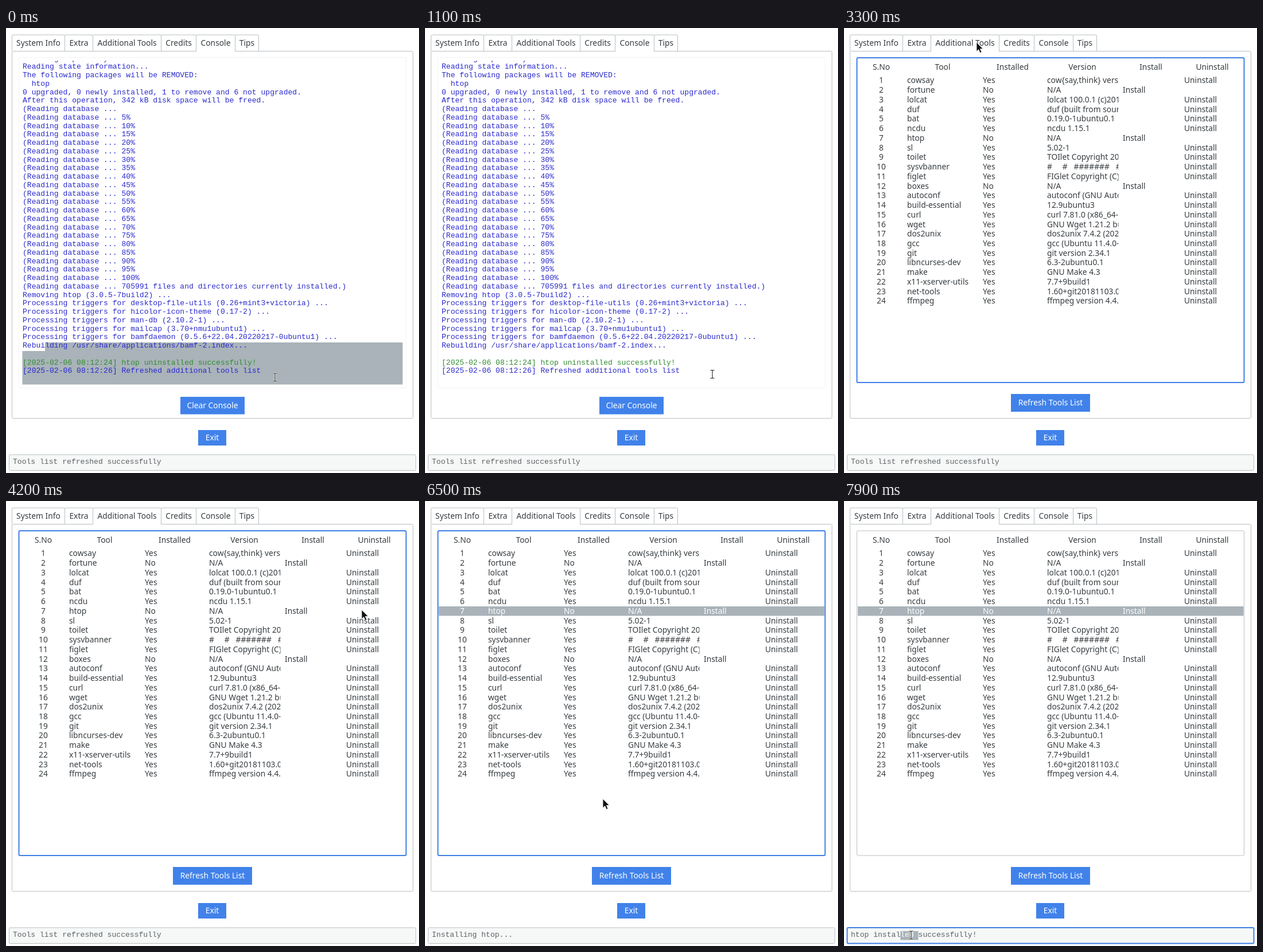
Write an HTML page that moves like this. It is 720x777 px and loops after 8000 ms.

```html
<!DOCTYPE html>
<html lang="en">
<head>
<meta charset="utf-8">
<title>Tool manager</title>
<style>
  html, body { margin: 0; height: 100%; overflow: hidden; background: #fff; }
  svg { display: block; width: 100vw; height: 100vh; }
  text { font: 13.8px "Noto Sans", sans-serif; fill: #363c40; white-space: pre; }
  .mono { font: 13.07px "Liberation Mono", monospace; fill: #2a2acc; }
  .ok { fill: #328c32; }
  .status { fill: #5c6062; }
  .light { fill: #fff; }
  .mid { text-anchor: middle; }
  .line { fill: none; stroke: #b9bfc2; }
  .sel { fill: #a9b3b9; }
  .button { fill: #4182ea; }
</style>
</head>
<body>
<svg id="stage" viewBox="0 0 720 777"></svg>
<script>
const LOOP = 8000, LINE = 14.75, ROW = 16.74, CHAR = 7.842;
const BLUE = '#3f7fe6', GREY = '#b9bfc2';

const text = (x, y, s, cls = '') => `<text x="${x}" y="${y}" class="${cls}">${s}</text>`;
const rect = (x, y, w, h, attrs) => `<rect x="${x}" y="${y}" width="${w}" height="${h}" ${attrs}/>`;
const button = (x, y, w, h, label) =>
  rect(x, y, w, h, 'class="button"') + text(x + w / 2, y + h / 2 + 4.8, label, 'mid light');

// Console page
const percents = Array.from({ length: 20 }, (_, i) => `(Reading database ... ${i * 5 + 5}%`);
const consoleLines = [
  'Building dependency tree...',
  'Reading state information...',
  'The following packages will be REMOVED:',
  '  htop',
  '0 upgraded, 0 newly installed, 1 to remove and 6 not upgraded.',
  'After this operation, 342 kB disk space will be freed.',
  '(Reading database ...',
  ...percents,
  '(Reading database ... 705991 files and directories currently installed.)',
  'Removing htop (3.0.5-7build2) ...',
  ...['desktop-file-utils (0.26+mint3+victoria)', 'hicolor-icon-theme (0.17-2)', 'man-db (2.10.2-1)',
    'mailcap (3.70+nmu1ubuntu1)', 'bamfdaemon (0.5.6+22.04.20220217-0ubuntu1)']
    .map(s => `Processing triggers for ${s} ...`),
  'Rebuilding /usr/share/applications/bamf-2.index...',
  '',
  '[2025-02-06 08:12:24] htop uninstalled successfully!',
  '[2025-02-06 08:12:26] Refreshed additional tools list'
];
const consolePage = `
  ${rect(22.5, 51.5, 675, 577, 'class="line" style="stroke:#f2f3f3"')}
  <path id="consoleSel" class="sel" d="M68 549H691.5V622.5H28.5V564H68Z"/>
  <g clip-path="url(#consoleClip)">${consoleLines.map((s, i) =>
    text(29, 56.6 + i * LINE, s, s.includes('uninstalled') ? 'mono ok' : 'mono')).join('')}</g>
  ${button(304, 644, 112, 30.5, 'Clear Console')}`;

// Tools page: name and version; a missing version means not installed
const tools = [
  ['cowsay', 'cow{say,think} version'], ['fortune'], ['lolcat', 'lolcat 100.0.1 (c)2011'],
  ['duf', 'duf (built from source)'], ['bat', '0.19.0-1ubuntu0.1'], ['ncdu', 'ncdu 1.15.1'], ['htop'],
  ['sl', '5.02-1'], ['toilet', 'TOIlet Copyright 2006'], ['sysvbanner', '#     #   #######   #'],
  ['figlet', 'FIGlet Copyright (C) 1991'], ['boxes'], ['autoconf', 'autoconf (GNU Autoconf)'],
  ['build-essential', '12.9ubuntu3'], ['curl', 'curl 7.81.0 (x86_64-pc'], ['wget', 'GNU Wget 1.21.2 built'],
  ['dos2unix', 'dos2unix 7.4.2 (2022'], ['gcc', 'gcc (Ubuntu 11.4.0-1ubuntu1'], ['git', 'git version 2.34.1'],
  ['libncurses-dev', '6.3-2ubuntu0.1'], ['make', 'GNU Make 4.3'], ['x11-xserver-utils', '7.7+9build1'],
  ['net-tools', '1.60+git20181103.0eebece'], ['ffmpeg', 'ffmpeg version 4.4.2']
];
const toolRow = ([name, version], i) => {
  const y = 96.4 + i * ROW;
  return `<g id="${name}">` + text(65, y, i + 1, 'mid') + text(110, y, name) +
    text(242, y, version ? 'Yes' : 'No') +
    `<g clip-path="url(#versionClip)">${text(354, y, version || 'N/A')}</g>` +
    (version ? text(593, y, 'Uninstall') : text(486, y, 'Install')) + '</g>';
};
const headers = [['S.No', 65], ['Tool', 172], ['Installed', 294], ['Version', 415.5], ['Install', 535], ['Uninstall', 642]];
const toolsPage = `
  ${rect(22.5, 52, 675, 567, 'id="tableFrame" class="line" rx="2"')}
  ${rect(24, 184, 672.5, 16.5, 'id="rowSel" class="sel"')}
  ${headers.map(([s, x]) => text(x, 72.8, s, 'mid')).join('')}
  ${tools.map(toolRow).join('')}
  ${button(291, 639, 138, 31, 'Refresh Tools List')}`;

const tabs = ['System Info', 'Extra', 'Additional Tools', 'Credits', 'Console', 'Tips'];
const edges = [10.5, 102.5, 151.5, 270.5, 331.5, 399.5, 440.5];
const tabBar = tabs.map((s, i) =>
  `<path class="line" d="M${edges[i]} 40V14q0 -2 2 -2H${edges[i + 1] - 2}q2 0 2 2V40"/>` +
  text((edges[i] + edges[i + 1]) / 2, 30.8, s, 'mid')).join('');

document.getElementById('stage').innerHTML = `
  <clipPath id="consoleClip">${rect(23, 57, 674, 570, '')}</clipPath>
  <clipPath id="versionClip">${rect(350, 52, 128.5, 567, '')}</clipPath>
  ${rect(10.5, 40.5, 699, 641, 'class="line" rx="2"')}
  ${tabBar}
  <path id="tabGap" stroke="#fff" stroke-width="2"/>
  <g id="consolePage">${consolePage}</g>
  <g id="toolsPage">${toolsPage}</g>
  ${button(335, 702, 49, 27, 'Exit')}
  ${rect(5.5, 745, 709, 27.5, 'id="statusFrame" rx="2" fill="#f6f8f8"')}
  ${rect(12 + 11 * CHAR, 751, 4 * CHAR, 15.5, 'id="statusSel" class="sel"')}
  <text id="status" x="12" y="760.7" class="mono status"></text>
  <path id="arrow" d="M0 0V16L3.7 12.5L6.3 18.5L9 17.3L6.4 11.5H11.3Z" fill="#111" stroke="#fff" stroke-width=".8"/>
  <g id="beam" fill="none"><path id="beamShape" stroke="#fff" stroke-width="2.6"
    d="M-3.5 -7H-1L0 -6L1 -7H3.5M0 -6V6M-3.5 7H-1L0 6L1 7H3.5"/><use href="#beamShape"/></g>`;

const el = id => document.getElementById(id);
el('beam').lastElementChild.remove();
const beamInk = el('beamShape').cloneNode();
beamInk.removeAttribute('id');
beamInk.setAttribute('stroke', '#222');
beamInk.setAttribute('stroke-width', '1.1');
el('beam').append(beamInk);

// Pointer positions, each held until the next: time, x, y
const pointer = [
  [0, 469, 610], [600, 484, 607], [1100, 501, 604.5], [1400, 440, 400], [1900, 300, 12], [2400, 246, 23],
  [2800, 231.5, 27], [3300, 231, 25], [3600, 645, 130], [3900, 634, 178], [4200, 620, 190], [4600, 530, 190],
  [4900, 520, 191], [5200, 519, 191], [6100, 490, 250], [6300, 410, 380], [6500, 310, 520], [6800, 190, 680],
  [7100, 122, 757], [7400, 117, 758]
];

const show = (id, on) => { el(id).style.display = on ? '' : 'none'; };
const stroke = (id, color, width) => Object.assign(el(id).style, { stroke: color, strokeWidth: width });

function statusText(t) {
  if (t < 5200) return 'Tools list refreshed successfully';
  const s = t < 7900 ? 'Installing htop...' : 'htop installed successfully!';
  if (t < 7600) return s;
  return `${s.slice(0, 11)}<tspan class="light">${s.slice(11, 15)}</tspan>${s.slice(15)}`;
}

function draw(t) {
  const onTools = t >= 3300, rowSelected = t >= 4600, statusFocus = t >= 7600;
  const tab = onTools ? 2 : 4;
  show('consolePage', !onTools);
  show('toolsPage', onTools);
  show('consoleSel', t < 1100);
  show('rowSel', rowSelected);
  show('statusSel', statusFocus);
  el('tabGap').setAttribute('d', `M${edges[tab] + .5} 40.5H${edges[tab + 1] - .5}`);
  el('htop').querySelectorAll('text').forEach(n => n.classList.toggle('light', rowSelected));
  stroke('tableFrame', statusFocus ? GREY : BLUE, statusFocus ? 1 : 2);
  stroke('statusFrame', t < 7100 ? GREY : BLUE, statusFocus ? 2 : 1);
  el('status').innerHTML = statusText(t);

  const [, x, y] = pointer.findLast(p => p[0] <= t);
  const isBeam = t < 1900 || t >= 7100;
  show('beam', isBeam);
  show('arrow', !isBeam);
  el(isBeam ? 'beam' : 'arrow').setAttribute('transform', `translate(${x} ${y})`);
}

const start = performance.now();
function tick() {
  draw((performance.now() - start) % LOOP);
  requestAnimationFrame(tick);
}
tick();
</script>
</body>
</html>
```
